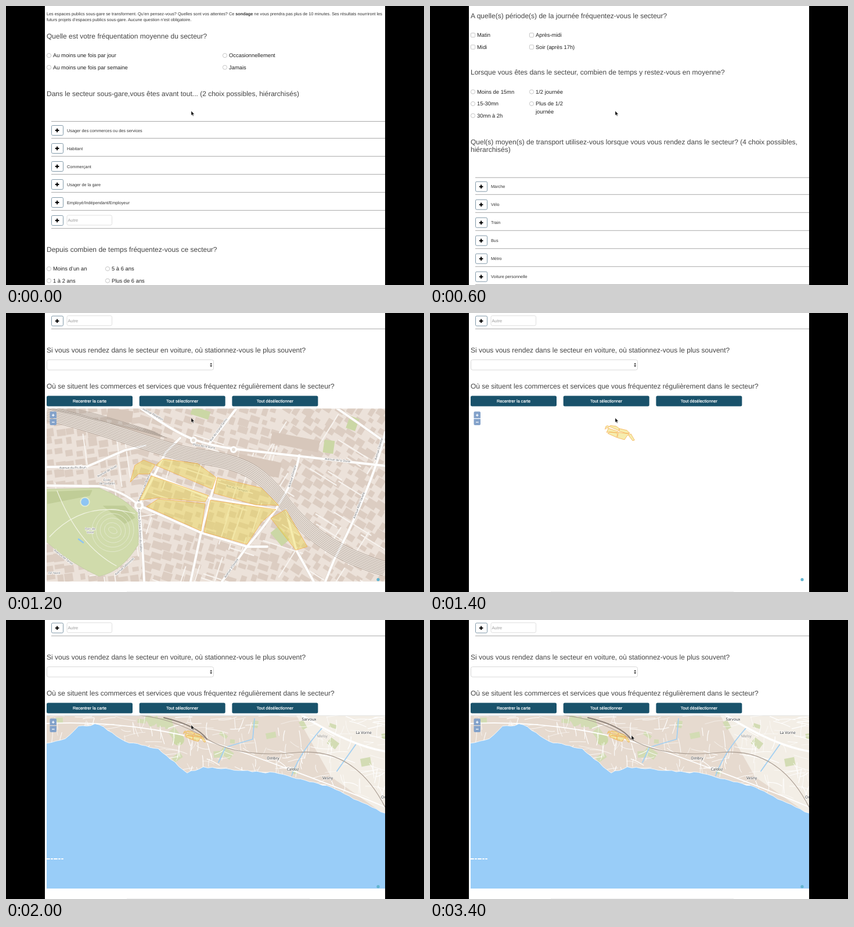
These frames come from a looping animation (720 px wide and 480 px high, 3600 ms). An HTML page:

```html
<!DOCTYPE html>
<html lang="fr">
<head>
<meta charset="utf-8">
<style>
  html, body { margin: 0; width: 100%; height: 100%; overflow: hidden; background: #000; }
  svg { display: block; width: 720px; height: 480px; }
  text { font: 9.38px "Liberation Sans", Arial, sans-serif; fill: #222; text-rendering: geometricPrecision; }
  .head { font-size: 12px; fill: #444; }
  .small { font-size: 7.3px; fill: #333; }
  .hint { font-size: 7.3px; fill: #999; }
  .btn { font-size: 7.3px; fill: #fff; stroke: #fff; stroke-width: .2px; text-anchor: middle; }
  .street { font: 5px "Noto Sans", sans-serif; fill: #666; text-anchor: middle; stroke: #fff; stroke-width: 1.4px; paint-order: stroke; }
  .town { font: 6.6px "Noto Sans", sans-serif; fill: #333; text-anchor: middle; stroke: #fff; stroke-width: 1.2px; paint-order: stroke; }
  .line { fill: none; stroke-linejoin: round; stroke-linecap: round; }
  .zone { fill: #ebd244; fill-opacity: .43; stroke: #f5a742; stroke-opacity: .7; vector-effect: non-scaling-stroke; }
</style>
</head>
<body>
<svg viewBox="0 0 720 480">
  <defs>
    <clipPath id="stageClip"><rect x="67" width="586" height="480"/></clipPath>
    <clipPath id="mapClip"><rect x="70" y="164.5" width="583" height="297.5"/></clipPath>
    <clipPath id="landClip"><path id="landShape"/></clipPath>
  </defs>
  <g clip-path="url(#stageClip)">
    <rect x="67" width="586" height="480" fill="#fff"/>
    <g id="page">
      <g id="survey"></g>
      <g transform="translate(0 1128)">
        <g id="parking"></g>
        <g clip-path="url(#mapClip)">
          <g id="near"></g>
          <g id="wide"></g>
          <g id="zones"></g>
          <circle cx="641" cy="458.7" r="2.6" fill="#62b4cf"/>
        </g>
        <g id="controls"></g>
        <rect x="208" y="479" width="315" height="1" fill="#efefef"/>
      </g>
    </g>
    <path id="cursor" d="M0 0V7.8L1.8 6.2 3 8.9 4.2 8.4 3.1 5.7H5.5Z" fill="#000" stroke="#fff" stroke-width=".5"/>
  </g>
</svg>
<script>
const $ = id => document.getElementById(id);
const LOOP = 3600, STEP = 200;

let seed = 7;
const rnd = (lo = 0, hi = 1) => {
  seed = (seed * 16807) % 2147483647;
  return lo + (hi - lo) * seed / 2147483647;
};
const repeat = (n, draw) => Array.from({ length: n }, (_, i) => draw(i)).join('');

// Survey form
const text = (x, y, str, cls = '') => `<text x="${x}" y="${y}" class="${cls}">${str}</text>`;
const heading = (y, str) => text(70, y + 4.3, str, 'head');
const rule = y => `<path d="M78 ${y}H653" stroke="#a9a9a9"/>`;

const choice = (x, y, label, radius) =>
  `<rect x="${x - 3.6}" y="${y - 3.6}" width="7.2" height="7.2" rx="${radius}" fill="#fff" stroke="#b8b8b8" stroke-width=".8"/>` +
  text(x + 7, y + 3.3, label);

const question = (y, title, columns, { gap = 101, radius = 3.6 } = {}) => heading(y, title) +
  columns.map((labels, c) => labels.map((label, i) => choice(74 + c * gap, y + 33.6 + i * 20.5, label, radius)).join('')).join('');

const plusButton = y =>
  `<rect x="78.5" y="${y - 8.3}" width="20" height="17" rx="2" fill="#fff" stroke="#8199a8"/>
   <path d="M84.8 ${y + .2}h6.6m-3.3-3.3v6.6" stroke="#000" stroke-width="2"/>`;

const ranking = (y, labels) => rule(y - 15.3) + [...labels, ''].map((label, i) => {
  const cy = y + i * 31;
  const field = `<rect x="105" y="${cy - 8.8}" width="77.5" height="17" rx="2.5" fill="#fff" stroke="#ddd" stroke-width=".9"/>` +
    text(106.5, cy + 2.2, 'Autre', 'hint');
  return plusButton(cy) + (label ? text(105, cy + 2.9, label, 'small') : field) + rule(cy + 13.8);
}).join('');

$('survey').innerHTML =
  text(70, 16.3, 'Les espaces publics sous-gare se transforment. Qu’en pensez-vous? Quelles sont vos attentes? Ce <tspan font-weight="700">sondage</tspan> ne vous prendra pas plus de 10 minutes. Ses résultats nourriront les', 'small') +
  text(70, 26.4, 'futurs projets d’espaces publics sous-gare. Aucune question n’est obligatoire.', 'small') +
  question(51.5, 'Quelle est votre fréquentation moyenne du secteur?',
    [['Au moins une fois par jour', 'Au moins une fois par semaine'], ['Occasionnellement', 'Jamais']], { gap: 303 }) +
  heading(151, 'Dans le secteur sous-gare,vous êtes avant tout... (2 choix possibles, hiérarchisés)') +
  ranking(213.8, ['Usager des commerces ou des services', 'Habitant', 'Commerçant', 'Usager de la gare', 'Employé/Indépendant/Employeur']) +
  question(418.5, 'Depuis combien de temps fréquentez-vous ce secteur?',
    [['Moins d’un an', '1 à 2 ans', '3 à 4 ans'], ['5 à 6 ans', 'Plus de 6 ans']]) +
  question(537.5, 'A quelle(s) période(s) de la journée fréquentez-vous le secteur?',
    [['Matin', 'Midi'], ['Après-midi', 'Soir (après 17h)']], { radius: 1.5 }) +
  question(635, 'Lorsque vous êtes dans le secteur, combien de temps y restez-vous en moyenne?',
    [['Moins de 15mn', '15-30mn', '30mn à 2h'], ['1/2 journée', 'Plus de 1/2']]) + text(182, 705.5, 'journée') +
  heading(754.5, 'Quel(s) moyen(s) de transport utilisez-vous lorsque vous vous rendez dans le secteur? (4 choix possibles,') +
  heading(768, 'hiérarchisés)') +
  ranking(831.5, ['Marche', 'Vélo', 'Train', 'Bus', 'Métro', 'Voiture personnelle', 'Covoiturage', 'Rovalite', 'Taxi', '2 roues motorisé']);

const mapButton = (label, i) => {
  const x = 70 + i * 159.7;
  return `<rect x="${x}" y="142.4" width="148" height="18" rx="2.5" fill="#19526b"/>` + text(x + 74, 154, label, 'btn');
};

$('parking').innerHTML =
  heading(63.5, 'Si vous vous rendez dans le secteur en voiture, où stationnez-vous le plus souvent?') +
  '<rect x="70.5" y="80.5" width="287" height="17.5" rx="3" fill="#fff" stroke="#d9d9d9"/>' +
  '<path d="M351.3 88.5l1.9-2.8 1.9 2.8zm0 1.6l1.9 2.8 1.9-2.8z" fill="#333"/>' +
  heading(126, 'Où se situent les commerces et services que vous fréquentez régulièrement dans le secteur?') +
  ['Recentrer la carte', 'Tout sélectionner', 'Tout désélectionner'].map(mapButton).join('');

$('controls').innerHTML =
  '<path d="M75.5 171.5q0-2 2-2h7.5q2 0 2 2v9.5h-11.5zm0 10.8h11.5v8.7q0 2-2 2h-7.5q-2 0-2-2z" fill="#83a2ca"/>' +
  '<path d="M79 175.8h4.6m-2.3-2.3v4.6M79 187.8h4.6" stroke="#fff" stroke-width="1.3"/>';

// Map helpers
const backdrop = color => `<rect x="70" y="164" width="583" height="298" fill="${color}"/>`;
const path = (d, color, width, extra = '') => `<path class="line" d="${d}" stroke="${color}" stroke-width="${width}" ${extra}/>`;
const dot = (x, y, r, color) => `<circle cx="${x}" cy="${y}" r="${r}" fill="${color}"/>`;
const block = (x, y, w, h, angle, color) =>
  `<rect x="${-w / 2}" y="${-h / 2}" width="${w}" height="${h}" transform="translate(${x} ${y}) rotate(${angle})" fill="${color}"/>`;
const label = cls => ([x, y, str, angle = 0]) =>
  `<text class="${cls}" transform="translate(${x} ${y}) rotate(${angle})" y="1.7">${str}</text>`;

// Close-up map
const grain = x => x < 230 ? -8 : x < 470 ? 18 : 32;

const buildings = repeat(32 * 17, i => {
  const x = 74 + (i % 32) * 18.5 + rnd(-3, 3), y = 168 + Math.floor(i / 32) * 18 + rnd(-3, 3);
  return block(x, y, rnd(8, 19), rnd(7, 15), grain(x), '#dccdc2');
});

const sideStreets = repeat(70, i => {
  const x = rnd(70, 653), y = rnd(164, 462), length = rnd(25, 75);
  const angle = (grain(x) + (i % 2) * 90) * Math.PI / 180;
  return path(`M${x} ${y}l${length * Math.cos(angle)} ${length * Math.sin(angle)}`, '#f8f4f0', 2);
});

const avenues = [
  'M232 164Q290 205 322 217T395 234T653 263',
  'M70 265L140 264 205 236 240 228',
  'M70 297L160 298Q200 305 229 331L275 240 300 215',
  'M229 331Q235 390 238 462',
  'M229 331L336 378 415 402H450',
  'M362 283L336 378 318 462',
  'M250 277L350 318 465 338',
  'M505 245Q495 310 415 402L372 462',
  'M653 205Q635 290 565 425L550 462',
  'M570 164L605 188 653 222',
  'M482 338L500 408 530 462',
  'M350 225L397 164'
];

const railway = 'M70 172C200 205 270 238 340 248S440 274 480 328S580 420 653 440';
const tracks = repeat(10, i => path(railway, '#a0948a', .7, `transform="translate(${4.5 - i} ${(i - 4.5) * 2.6})"`));
const sidings = repeat(6, i => path(`M${70 + i * 9} 164Q170 ${186 - i * 2} ${277 - i * 4} ${215 - i * 2}`, '#a0948a', .7));

const contours = repeat(5, i =>
  `<ellipse class="line" cx="184" cy="374" rx="${8 + i * 7}" ry="${5 + i * 8}" transform="rotate(28 184 374)" stroke="#e4ead0" stroke-width=".8"/>`);
const parkland =
  path('M70 303L160 301Q205 318 228 345V398Q200 445 160 453Q110 430 70 394Z', '#c6cfa8', 1, 'style="fill:#d0dbab"') +
  path('M72 308L148 305 144 314 72 328ZM168 332L205 332 222 352 205 362Z', '#c0cd97', 1, 'style="fill:#c0cd97"') + contours +
  path('M88 306Q125 400 190 435M75 385Q135 320 222 345', '#f2f4e4', 1.2) +
  dot(136, 325, 8.6, '#e3ecd0') + dot(136, 325, 6.8, '#8ec5f3') + path('M125 389l8 6', '#8ec5f3', 2.5);

const roundabout = (x, y, r) => dot(x, y, r, '#fff') + dot(x, y, r / 2, '#e6ddd4');

const streetNames = [
  [253, 174, 'Avenue Pélardon', 29], [341, 229, 'Place de la Dune', 9], [571, 253, 'Avenue de la Dune', 6],
  [115, 266, 'Avenue du Pic-Brun', -1], [174, 272, 'Avenue de Vorel', -29], [174, 287, 'École'], [174, 293, 'de Sorbelin'],
  [238, 300, 'Avenue Lucien-Brémat', -68], [231, 374, 'Avenue Octave-Simon-du-Valtor', 87],
  [366, 201, 'Rue du Grand-Tamis', -54], [493, 281, 'Avenue d’Ombre', -74], [388, 439, 'Avenue d’Ombre', -55],
  [608, 331, 'Avenue Rémi-Tavelle', -69], [642, 234, 'Avenue Clairette', -73], [398, 302, 'Rue du Tremplin', 15],
  [145, 371, 'Parc de'], [145, 377, 'Vorel'], [99, 420, 'Avenue de Tarsel', 38], [204, 436, 'Avenue Sablonnet', -42], [83, 447, 'ISF Nord']
];

$('near').innerHTML =
  backdrop('#ece2da') + buildings + sideStreets +
  block(196, 176, 44, 20, 8, '#d7c7bb') + block(222, 205, 90, 12, 15, '#d7c7bb') +
  block(436, 263, 74, 26, 12, '#d7c7bb') + block(498, 222, 84, 20, 11, '#d7c7bb') +
  block(335, 172, 32, 14, 18, '#cbd7a5') + block(556, 230, 18, 22, 8, '#cbd7a5') +
  block(597, 190, 17, 22, 20, '#cbd7a5') + block(472, 384, 30, 18, 50, '#cbd7a5') +
  parkland + path(railway, '#e9e0d8', 25) +
  avenues.map(d => path(d, '#e0d5cb', 5)).join('') + avenues.map(d => path(d, '#fff', 3.8)).join('') +
  tracks + sidings +
  roundabout(323, 219, 6) + roundabout(392, 235, 6) + roundabout(229, 331, 8) +
  streetNames.map(label('street')).join('');

// Selectable blocks
$('zones').innerHTML = [
  '214,291 222,262 237,253 257,261 247,277 228,277',
  '258,262 270,251 330,259 362,283 355,303',
  '364,283 440,301 470,331 430,330 358,310',
  '230,322 250,280 349,314 343,325 262,318',
  '242,333 262,320 343,328 336,375',
  '352,322 465,338 440,360 415,398 341,377',
  '456,353 482,338 519,402 499,408'
].map(p => `<polygon class="zone" points="${p}"/>`).join('');

// Overview map: a few shore points joined by a rough line
const shorePoints = [[70, 212], [102, 204], [125, 183], [160, 179], [205, 209], [262, 221], [312, 263], [340, 253], [470, 264], [560, 288], [653, 333]];
const shore = shorePoints.reduce((d, [x, y], i) => {
  if (!i) return `M${x} ${y}`;
  const [px, py] = shorePoints[i - 1], parts = Math.ceil((x - px) / 8);
  return d + repeat(parts, k => {
    const u = (k + 1) / parts;
    return `L${px + (x - px) * u} ${py + (y - py) * u + rnd(-1.3, 1.3)}`;
  });
}, '');
$('landShape').setAttribute('d', shore + 'V164H70Z');

const woods = repeat(24, () => block(rnd(70, 653), rnd(166, 270), rnd(8, 24), rnd(6, 16), rnd(-40, 40), '#d3dcb4'));
const lanes = repeat(300, i => {
  const x = rnd(70, 653), y = rnd(164, 300), steep = i % 2;
  const dx = steep ? rnd(-9, 9) : rnd(14, 40), dy = steep ? rnd(12, 30) : rnd(-8, 12);
  return path(`M${x} ${y}q${dx / 2 + rnd(-4, 4)} ${dy / 2 + rnd(-4, 4)} ${dx} ${dy}`, '#fff', rnd(.5, 1.2));
});

$('wide').innerHTML =
  backdrop('#99cdf8') + '<g clip-path="url(#landClip)">' + backdrop('#e6dacf') +
  path('M500 164H653V335L560 270Z', 'none', 0, 'style="fill:#f3eee6"') + woods + dot(297, 206, 10, '#cdd9a8') + lanes +
  path('M428 170L425 205 378 219 366 245M545 185Q505 230 492 268M604 212L570 260', '#a3d0f2', 1.8) +
  path('M510 164Q590 215 653 226', '#fff', 3.5) + path('M70 178Q250 170 420 232T653 322', '#fff', 1.8) +
  path('M230 164Q290 170 345 204T500 228T653 322', '#a89b90', 1.1) + path('M272 168Q330 182 346 205', '#8d8178', 2) +
  '</g>' + path(shore, '#fff', .8) + path('M70 411h28', '#fff', 2, 'stroke-dasharray="5 3 2 3"') +
  [[522, 171, 'Sarvoux'], [616, 194, 'La Vorne'], [460, 238, 'Ombry'], [494, 257, 'Caldoz'], [554, 272, 'Vesny'], [650, 305, 'Or']]
    .map(label('town')).join('') +
  `<g opacity=".5">${label('town')([545, 200, 'Melsy'])}</g>`;

// Timeline: two decelerating scroll flicks, a zoom out, then a pointer move
const clamp = u => Math.min(1, Math.max(0, u));
const flick = u => u + .28 * u * (1 - u);
const show = (id, on) => $(id).setAttribute('visibility', on ? 'visible' : 'hidden');
const start = performance.now();

function render(time) {
  const step = Math.floor(time / STEP);
  const scroll = Math.round(521 * flick(clamp(step / 3)) + 607 * flick(clamp((step - 3) / 3)));
  const zoom = Math.max(1 / 8, 6 ** Math.min(0, 6 - step));
  const move = clamp((step - 11) / 2);
  $('page').setAttribute('transform', `translate(0 ${-scroll})`);
  $('zones').setAttribute('transform', `translate(319 182) scale(${zoom}) translate(-319 -182)`);
  $('cursor').setAttribute('transform', `translate(${319 + 28 * move} ${180.5 + 18 * move})`);
  show('near', step < 7);
  show('wide', step >= 10);
}

function tick() {
  render((performance.now() - start) % LOOP);
  requestAnimationFrame(tick);
}
tick();
</script>
</body>
</html>
```
